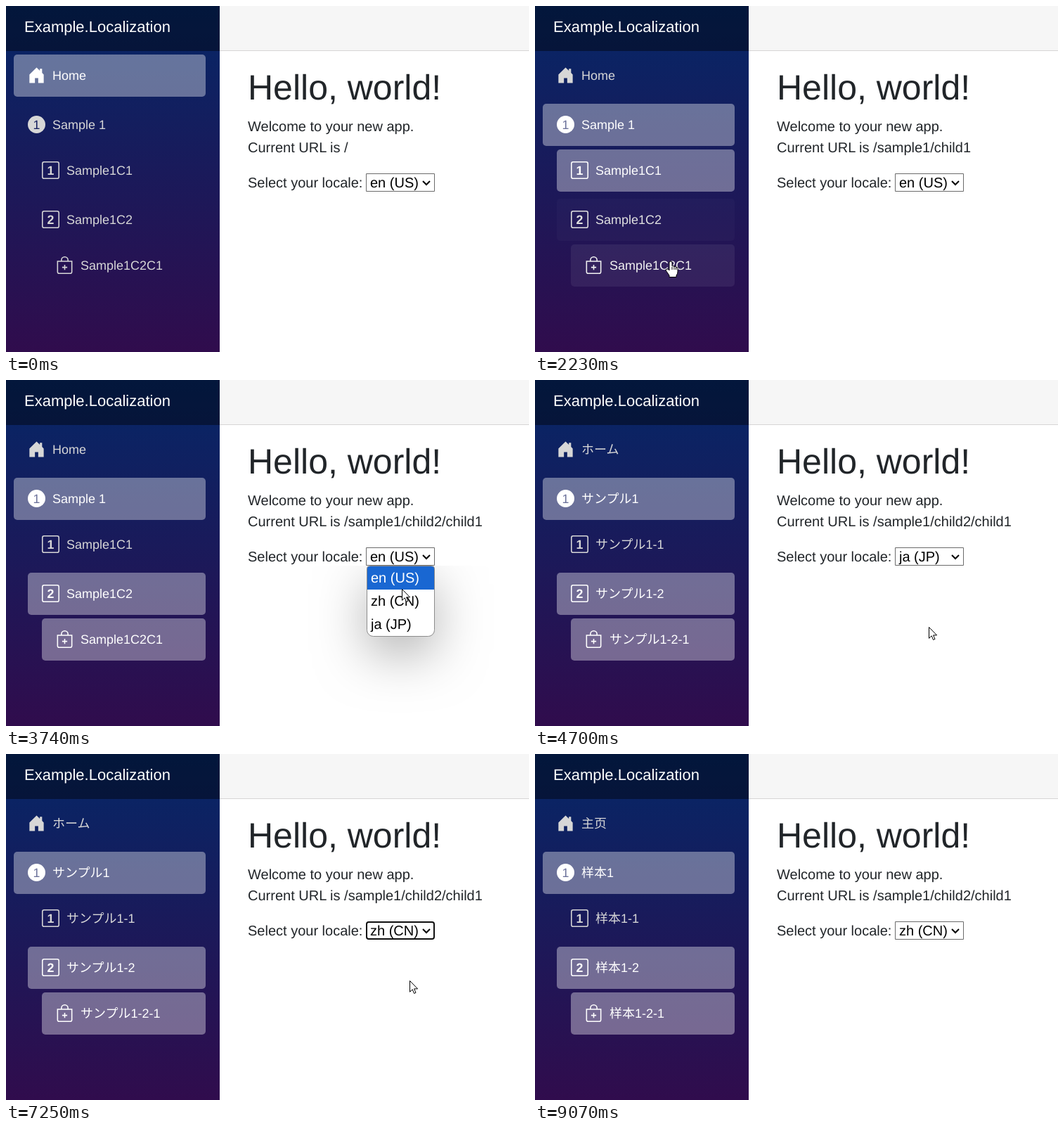
An HTML page with a canvas for the animation above (9800 ms loop, 744 by 492 pixels).

```html
<!DOCTYPE html>
<html lang="en">
<head>
<meta charset="utf-8">
<title>Localization demo</title>
<style>
html, body { margin: 0; width: 744px; height: 492px; overflow: hidden; background: #fff; }
canvas { display: block; }
</style>
</head>
<body>
<canvas id="stage" width="744" height="492"></canvas>
<script>
const ctx = document.getElementById('stage').getContext('2d');
const LOOP = 9800;
const START = 730, END = 9070; // pointer on stage
const TICK = 68.2;
const FADE = 150;              // link highlight transition

const LATIN = '"Liberation Sans", Arial, ';
const LOCALES = {
  en: { font: LATIN + 'sans-serif', option: 'en (US)',
        labels: ['Home', 'Sample 1', 'Sample1C1', 'Sample1C2', 'Sample1C2C1'] },
  zh: { font: LATIN + '"Noto Sans CJK SC", "Noto Sans CJK", sans-serif', option: 'zh (CN)',
        labels: ['主页', '样本1', '样本1-1', '样本1-2', '样本1-2-1'] },
  ja: { font: LATIN + '"Noto Sans CJK JP", "Noto Sans CJK", sans-serif', option: 'ja (JP)',
        labels: ['ホーム', 'サンプル1', 'サンプル1-1', 'サンプル1-2', 'サンプル1-2-1'] }
};
const ORDER = Object.keys(LOCALES);
const ROW = 33;

const LINKS = [
  { url: '/', icon: house },
  { url: '/sample1', icon: disc },
  { url: '/sample1/child1', icon: () => square('1') },
  { url: '/sample1/child2', icon: () => square('2') },
  { url: '/sample1/child2/child1', icon: bag }
];
// Indent by depth; children sit closer to their parent than siblings do.
LINKS.forEach((link, i) => {
  const above = LINKS[i - 1];
  link.x = 20 * link.url.split('/').length - 29;
  link.y = above ? above.y + (link.x > above.x ? 65 : 70) : 69;
});

// Pointer moves: [start, end, x, y]
const MOVES = [
  [START, 1280, 190, 176],
  [1280, 1690, 190, 238],
  [1760, 2310, 193, 371],
  [2510, 2800, 290, 392],
  [2800, 3400, 566, 254],
  [3500, 4000, 560, 351],
  [5700, 6060, 574, 254],
  [6320, 6790, 574, 322],
  [7250, 7600, 642, 339],
  [8670, 9060, 740, 500]
];

const EVENTS = [
  [0, { url: '/', choice: 'en', lang: 'en', open: false, focus: false }],
  [1340, { url: '/sample1' }],
  [1820, { url: '/sample1/child1' }],
  [2570, { url: '/sample1/child2/child1' }],
  [3540, { open: true }],
  [4420, { open: false, choice: 'ja', focus: true }],
  [4700, { lang: 'ja', focus: false }],
  [6200, { open: true }],
  [7180, { open: false, choice: 'zh', focus: true }],
  [7460, { lang: 'zh', focus: false }]
];

const stateAt = t => Object.assign({}, ...EVENTS.filter(e => e[0] <= Math.max(0, t)).map(e => e[1]));
const smooth = p => p * p * (3 - 2 * p);

function pointerAt(t) {
  let x = 584, y = 443;
  for (const [from, to, tx, ty] of MOVES) {
    const p = smooth(Math.min(1, Math.max(0, (t - from) / (to - from))));
    x += (tx - x) * p;
    y += (ty - y) * p;
  }
  return { x, y };
}

const inside = (link, { x, y }) => x >= link.x && x < 284 && y >= link.y && y < link.y + 60;

// Highlight opacity a link is heading for: hover wins over active.
function target(link, t) {
  if (t >= START && t < END && inside(link, pointerAt(t))) return .1;
  const { url } = stateAt(t);
  const active = link.url === '/' ? url === '/' : url.startsWith(link.url);
  return active ? .37 : 0;
}

// A linear transition is the mean of the recent targets.
function highlight(link, t) {
  const n = 12;
  let alpha = 0, lit = 0;
  for (let i = 0; i < n; i++) {
    const v = target(link, t - i * FADE / n);
    alpha += v / n;
    lit += (v > 0) / n;
  }
  return { alpha, lit };
}

function text(str, x, y, size, color, font = LOCALES.en.font) {
  ctx.font = `${size}px ${font}`;
  ctx.textRendering = 'geometricPrecision';
  ctx.fillStyle = color;
  ctx.fillText(str, x, y);
}

function rect(x, y, w, h, color) {
  ctx.fillStyle = color;
  ctx.fillRect(x, y, w, h);
}

function rounded(x, y, w, h, r) {
  ctx.beginPath();
  ctx.roundRect(x, y, w, h, r);
}

// Icons are drawn on a 16 x 16 grid in the current colour.
function house() {
  ctx.fill(new Path2D('M8 1l3 2.8V2h2v3.8l1.5 1.5V15h-5v-4.5h-3V15h-5V7.3z'));
}

function digit(str, weight) {
  ctx.font = `${weight} 11.4px ${LOCALES.en.font}`;
  ctx.textAlign = 'center';
  ctx.fillText(str, 8, 12);
}

function disc(alpha) {
  ctx.beginPath();
  ctx.arc(8, 8, 8, 0, 7);
  ctx.fill();
  const [r, g, b] = [20, 30, 94].map(c => c + (255 - c) * alpha);
  ctx.fillStyle = `rgb(${r},${g},${b})`;
  digit('1', 'normal');
}

function square(str) {
  rounded(.5, .5, 15, 15, 1.5);
  ctx.stroke();
  digit(str, 'bold');
}

function bag() {
  rounded(1.5, 4.5, 13, 11, [0, 0, 1.5, 1.5]);
  ctx.moveTo(5, 4.5);
  ctx.arc(8, 3.5, 3, Math.PI, 0);
  ctx.lineTo(11, 4.5);
  ctx.moveTo(5.7, 10);
  ctx.lineTo(10.3, 10);
  ctx.moveTo(8, 7.7);
  ctx.lineTo(8, 12.3);
  ctx.stroke();
}

function drawSidebar(step, lang) {
  const g = ctx.createLinearGradient(0, 0, 0, 602);
  g.addColorStop(0, 'rgb(5,39,103)');
  g.addColorStop(1, '#3a0647');
  rect(0, 0, 304, 492, g);
  rect(0, 0, 304, 64, 'rgba(0,0,0,.42)');
  text('Example.Localization', 26, 37, 22, '#fff');

  const { labels, font } = LOCALES[lang];
  LINKS.forEach((link, i) => {
    const { alpha, lit } = highlight(link, step);
    rounded(link.x, link.y, 284 - link.x, 60, 5);
    ctx.fillStyle = `rgba(255,255,255,${alpha})`;
    ctx.fill();
    const v = Math.round(215 + 40 * lit);
    const color = `rgb(${v},${v},${v})`;
    text(labels[i], link.x + 55, link.y + 36, 18, color, font);
    ctx.save();
    ctx.translate(link.x + 20, link.y + 17);
    ctx.scale(25 / 16, 25 / 16);
    ctx.fillStyle = ctx.strokeStyle = color;
    ctx.lineWidth = 1;
    link.icon(alpha);
    ctx.restore();
  });
}

function drawSelect({ focus, choice }) {
  const ring = focus ? 2 : 1;
  ctx.strokeStyle = focus ? '#101010' : '#6b6b6b';
  ctx.lineWidth = ring;
  rounded(512 + ring / 2, 238 + ring / 2, 98 - ring, 26 - ring, focus ? 3 : 0);
  ctx.stroke();
  text(LOCALES[choice].option, 518, 258, 20, '#000');
  ctx.beginPath();
  ctx.moveTo(593, 249);
  ctx.lineTo(598, 254);
  ctx.lineTo(603, 249);
  ctx.strokeStyle = '#000';
  ctx.lineWidth = 2;
  ctx.stroke();
}

function drawMenu({ choice }, step) {
  // The highlight trails the pointer by one tick.
  const row = Math.floor((pointerAt(step - TICK).y - 265) / ROW);
  const hot = ORDER[row] || choice;
  const frame = () => rounded(513.5, 264.5, 96, 100, [4, 4, 9, 9]);
  ctx.save();
  ctx.beginPath();
  ctx.rect(304, 264, 440, 228);
  ctx.clip();
  ctx.shadowColor = 'rgba(0,0,0,.3)';
  ctx.shadowBlur = 70;
  ctx.shadowOffsetY = 25;
  frame();
  ctx.fillStyle = '#fff';
  ctx.fill();
  ctx.restore();

  ctx.save();
  frame();
  ctx.clip();
  ORDER.forEach((id, i) => {
    const on = id === hot;
    if (on) rect(513, 265 + i * ROW, 97, ROW, '#1967d2');
    text(LOCALES[id].option, 519, 288 + i * ROW, 20, on ? '#fff' : '#000');
  });
  ctx.restore();
  frame();
  ctx.strokeStyle = '#8c8c8c';
  ctx.lineWidth = 1;
  ctx.stroke();
}

function drawMain(state, step) {
  rect(304, 0, 440, 63, '#f6f6f6');
  rect(304, 63, 440, 1, '#d6d5d5');
  const ink = '#212529';
  text('Hello, world!', 344, 133, 50, ink);
  text('Welcome to your new app.', 344, 178, 20, ink);
  text('Current URL is ' + state.url, 344, 208, 20, ink);
  text('Select your locale:', 344, 258, 20, ink);
  drawSelect(state);
  if (state.open) drawMenu(state, step);
}

const ARROW = new Path2D('M.5.5V16.3L4.2 12.8 6.6 18.5 9 17.4 6.6 11.9H11.6z');
const HAND = new Path2D('M-2 2Q-2 0 0 0T2 2V7Q4 5.8 5 7.6 7 6.6 7.8 8.6 10 8 10 10.5V15Q10 18 8 20V22.5H-2V20' +
  'L-6.5 13.5Q-7.4 11-5 10.8-3.5 11-2 13zM2 8V12M5 8V12M7.6 8.6V12');

function drawPointer(step) {
  const at = pointerAt(step);
  const shape = LINKS.some(link => inside(link, at)) ? HAND : ARROW;
  ctx.save();
  ctx.translate(Math.round(at.x), Math.round(at.y));
  ctx.fillStyle = '#fff';
  ctx.strokeStyle = '#000';
  ctx.lineWidth = 1;
  ctx.lineJoin = 'round';
  ctx.fill(shape);
  ctx.stroke(shape);
  ctx.restore();
}

function draw(t) {
  const step = START + Math.floor((t - START + 20) / TICK) * TICK;
  const state = stateAt(t);
  rect(0, 0, 744, 492, '#fff');
  drawSidebar(step, state.lang);
  drawMain(state, step);
  if (t >= START && t < END) drawPointer(step);
}

const begin = performance.now();
function frame() {
  draw((performance.now() - begin) % LOOP);
  requestAnimationFrame(frame);
}
frame();
</script>
</body>
</html>
```
